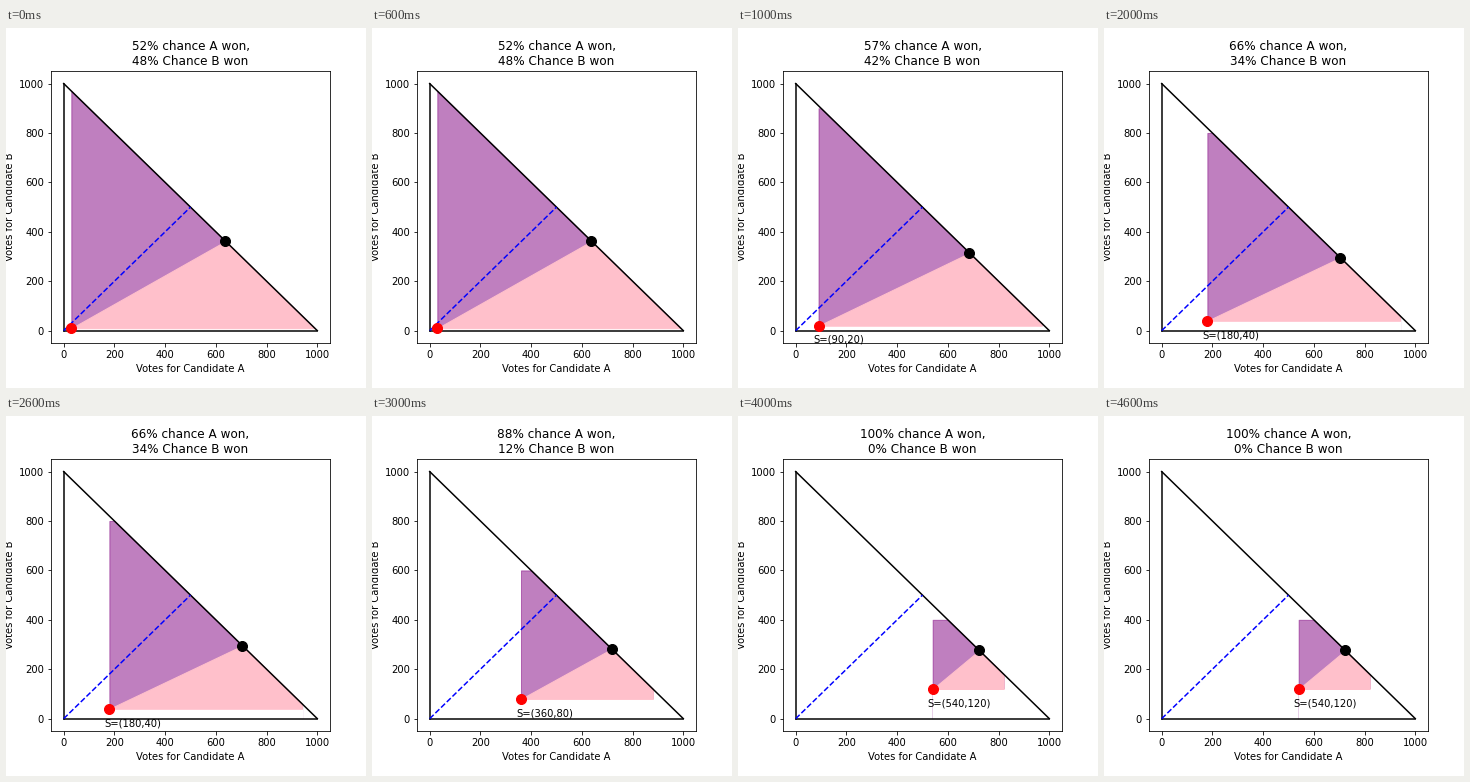
These frames come from a looping animation (360x360 px, 5000 ms). A matplotlib script:

```python
import matplotlib.pyplot as plt
from matplotlib.animation import FuncAnimation

plt.rcParams["font.family"] = "DejaVu Sans"

TOTAL = 1000
SHARE_A, SHARE_B = 0.9, 0.2
EARLY_GAP = 0.3
COUNTED = [TOTAL / 30, 100, 200, 400, 600]

fig, ax = plt.subplots(figsize=(5, 5), dpi=72)
fig.subplots_adjust(left=0.125, right=0.9, bottom=0.125, top=0.88)


def tens(v):
    return int(round(v, -1))


def chance_b(n):
    x = n / TOTAL
    return max(0, (1 - 2 * x) * (0.5 + EARLY_GAP * x))


def draw(i):
    n = COUNTED[i]
    a, b = tens(SHARE_A * n), tens(SHARE_B * n)
    corner, right = tens(n), tens(TOTAL - EARLY_GAP * n)
    # the expected result settles towards three quarters for A
    end_b = TOTAL / 4 + 648 / n ** 0.5
    end_a = TOTAL - end_b
    ax.clear()

    # outcomes still open: B's side in purple, A's side in pink
    top = TOTAL - corner
    ax.fill_between([a, corner, right], 0, [top, top, TOTAL - right],
                    color="purple", alpha=0.5)
    ax.fill_between([a, right], 0, b, color="white")
    ax.fill_between([a, end_a, right], b, [b, end_b, TOTAL - right], color="pink")

    for xs, ys in (((0, 0), (0, TOTAL)), ((0, TOTAL), (0, 0)), ((0, TOTAL), (TOTAL, 0))):
        ax.plot(xs, ys, color="black")
    ax.plot([0, TOTAL / 2], [0, TOTAL / 2], "--", color="blue")
    ax.plot(end_a, end_b, "o", color="black", markersize=10)
    ax.plot(a, b, "o", color="red", markersize=10)
    if i > 0:
        ax.text(a - 20, b - 70, f"S=({a},{b})")

    win_b = chance_b(n)
    win_a = int(round(1 - win_b, 2) * 100)
    ax.set_title(f"{win_a}% chance A won,\n{round(100 * win_b)}% Chance B won")
    ax.set(xlim=(-50, 1050), ylim=(-50, 1050),
           xlabel="Votes for Candidate A", ylabel="Votes for Candidate B")
    return []


anim = FuncAnimation(fig, draw, frames=len(COUNTED), interval=1000,
                     init_func=lambda: [], repeat=True, repeat_delay=0)
plt.show()
```
